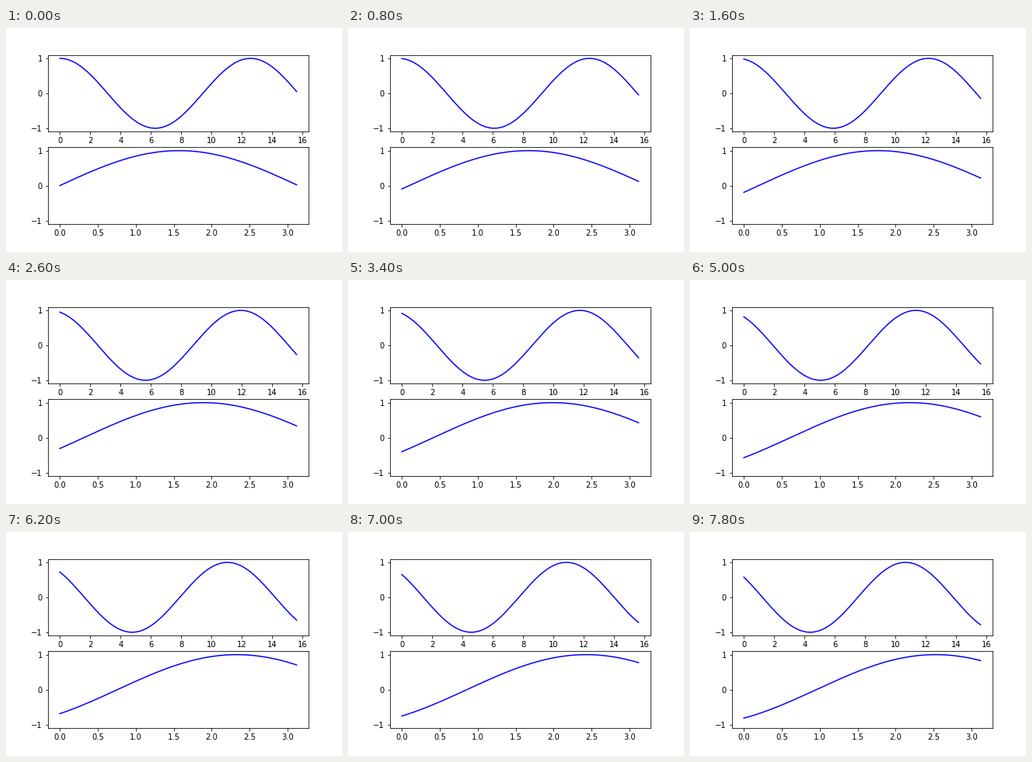
A matplotlib script that plays this animation: 432 px wide and 288 px high, repeating every 8000 ms.

```python
import numpy as np
import matplotlib.pyplot as plt
from matplotlib.animation import FuncAnimation

FRAMES = 40
INTERVAL = 200
PHASE_STEP = 2 * np.pi / 256

plt.rcParams.update({"font.family": "DejaVu Sans", "font.size": 10})

fig, (ax_cos, ax_sin) = plt.subplots(2, 1, figsize=(6, 4), dpi=72)
fig.subplots_adjust(left=0.125, right=0.9, bottom=0.125, top=0.88, hspace=0.2)

x_cos = np.linspace(0, 15.6, 157)
x_sin = np.linspace(0, 3.12, 157)


def cos_wave(phase):
    return np.cos(x_cos / 2 + phase)


def sin_wave(phase):
    return np.sin(x_sin - phase)


cos_line, = ax_cos.plot(x_cos, cos_wave(0), color="blue", lw=1.5)
sin_line, = ax_sin.plot(x_sin, sin_wave(0), color="blue", lw=1.5)
for ax in (ax_cos, ax_sin):
    ax.set_ylim(-1.1, 1.1)


def update(i):
    phase = i * PHASE_STEP
    cos_line.set_ydata(cos_wave(phase))
    sin_line.set_ydata(sin_wave(phase))
    return cos_line, sin_line


anim = FuncAnimation(fig, update, frames=FRAMES, interval=INTERVAL, repeat=True)
plt.show()
```
